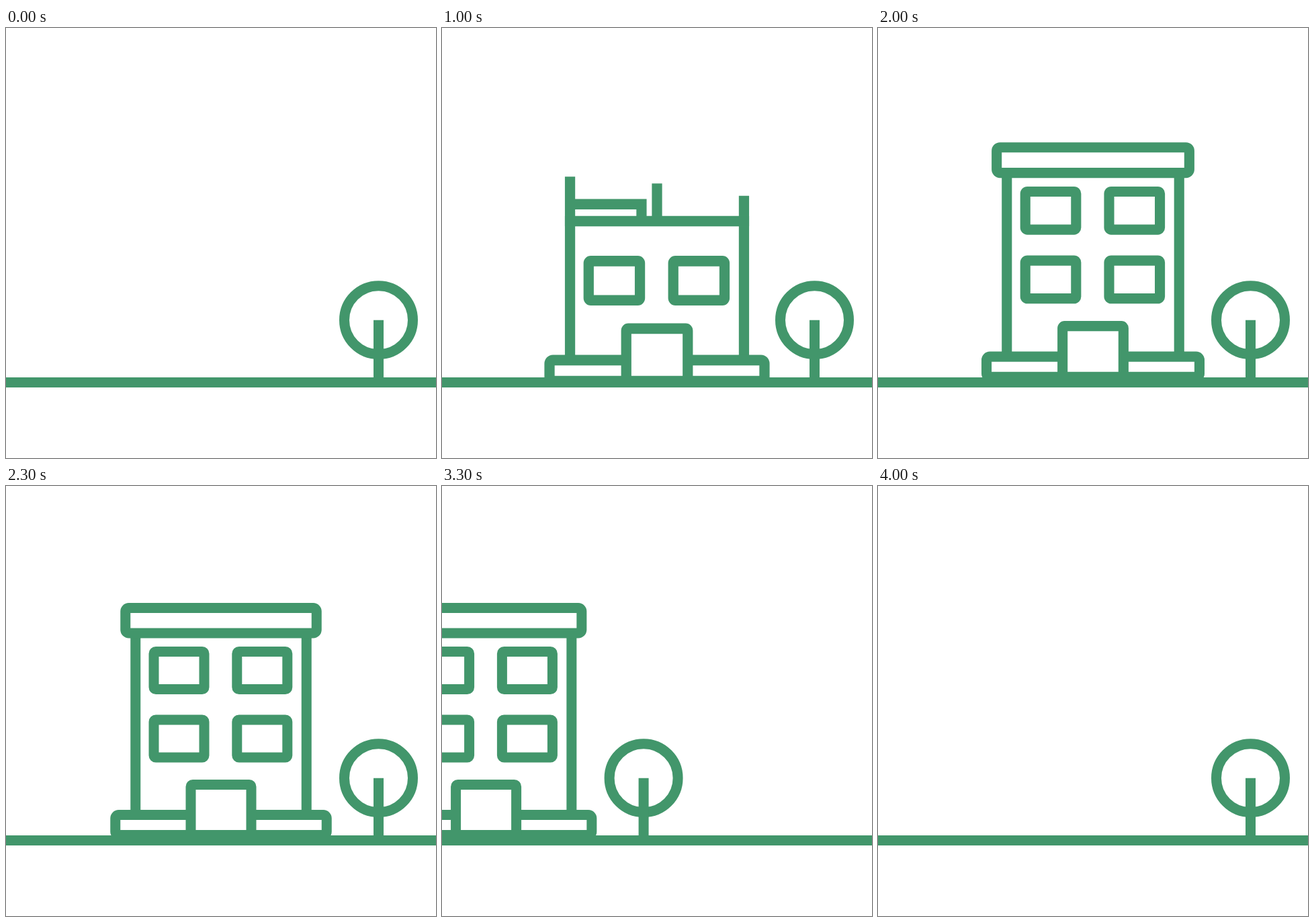
These frames come from a looping animation (640 by 640 pixels, 4900 ms). An HTML page with a canvas:

```html
<!DOCTYPE html>
<html lang="en">
<head>
<meta charset="utf-8">
<title>Building by a tree</title>
<style>
  html, body { margin: 0; width: 100%; height: 100%; overflow: hidden; background: #fff; }
  canvas { display: block; width: 640px; height: 640px; }
</style>
</head>
<body>
<canvas id="stage" width="640" height="640"></canvas>
<script>
const ctx = document.getElementById('stage').getContext('2d');
const LOOP = 4900, STEP = 100;
const LEFT = 192.75, MID = 320, RIGHT = 447.25, ROOF = 219, GROUND = 520;

const mix = (a, b, k) => a + (b - a) * k;
const progress = (t, start, end) => Math.min(1, Math.max(0, (t - start) / (end - start)));

// Cubic Bezier easing (0.192, 0, 0.64, 1)
function ease(x) {
  let lo = 0, hi = 1, u;
  for (let i = 0; i < 24; i++) {
    u = (lo + hi) / 2;
    const v = 1 - u;
    if (3 * u * v * v * 0.192 + 3 * u * u * v * 0.64 + u ** 3 < x) lo = u;
    else hi = u;
  }
  return u * u * (3 - 2 * u);
}

function line(...pts) {
  ctx.beginPath();
  for (let i = 0; i < pts.length; i += 2) ctx.lineTo(pts[i], pts[i + 1]);
  ctx.stroke();
}

// Rounded box, scaled about its centre
function box(x, y, w, h, r, k = 1) {
  if (k <= 0) return;
  ctx.save();
  ctx.translate(x + w / 2, y + h / 2);
  ctx.scale(k, k);
  ctx.beginPath();
  ctx.roundRect(-w / 2, -h / 2, w, h, r);
  ctx.fill();
  ctx.stroke();
  ctx.restore();
}

function tree(x) {
  ctx.beginPath();
  ctx.arc(x, 434.7, 51, 0, 7);
  ctx.stroke();
  line(x, 434.7, x, 522);
}

function walls(t, roofed) {
  // Everything slows as it nears its end; a higher power starts faster
  const grow = (from, to, power) =>
    mix(to, from, (1 - progress(t, 200, 1400)) ** power);
  const rise = (top, power) => grow(GROUND, top, power);

  line(LEFT, 489, LEFT, roofed ? ROOF : rise(200, 2.23));
  line(RIGHT, 489, RIGHT, roofed ? ROOF : rise(176, 1.34));
  if (roofed) return;

  const high = rise(208.7, 1.21), low = rise(246.2, 2.35);
  const corner = grow(LEFT, MID, 1.57);
  line(MID, high, MID, rise(176, 1.57));
  line(LEFT, low, corner, low, corner, high);
  line((high > low ? LEFT : corner) - 7.5, high, RIGHT + 7.5, high);
}

function stretch(sx, sy, pivot) {
  ctx.transform(sx, 0, 0, sy, MID * (1 - sx), pivot * (1 - sy));
}

function building(t) {
  const roofed = t >= 1500, done = t >= 1800;
  ctx.save();
  if (done) {
    const pop = Math.sin(Math.PI * progress(t, 1935, 2300)) ** 2;
    stretch(1 + 0.0275 * pop, 1 + 0.0385 * pop, 527);
  } else {
    const s = progress(t, 700, 1700), k = 0.02 - 0.009 * s;
    stretch(1 + k, 1 + 2.47 * k, 390 - 48 * s);
  }

  walls(t, roofed);
  for (const x of [220, 343.8]) {
    box(x, 348, 75, 56, 3, progress(t, 700, 1000));
    box(x, 246.5, 75, 56, 3, progress(t, 1000, 1300));
  }

  const baseHeight = 30 * progress(t, 100, 500);
  box(162.75, 519.5 - baseHeight, 314.5, baseHeight, 5);
  const doorHeight = 75 * progress(t, 200, 600);
  box(275, 519.5 - doorHeight, 90, doorHeight, [3, 3, 0, 0]);

  if (roofed) {
    box(177.75, done ? 181.5 : 176, 284.5, 37.5, 5, mix(0.4, 1, progress(t, 1400, 1600)));
  }
  ctx.restore();
}

function draw(t) {
  ctx.fillStyle = '#fff';
  ctx.strokeStyle = '#42966b';
  ctx.lineWidth = 15;
  ctx.fillRect(0, 0, 640, 640);

  ctx.save();
  ctx.translate(-640 * ease(progress(t, 2900, 4000)), 0);
  if (t >= 200) building(t);
  tree(554.5);
  tree(554.5 + 640);
  ctx.restore();

  line(0, 527.5, 640, 527.5);
}

const start = performance.now();
function frame() {
  const t = (performance.now() - start) % LOOP;
  draw(Math.floor(t / STEP) * STEP);
  requestAnimationFrame(frame);
}
frame();
</script>
</body>
</html>
```
